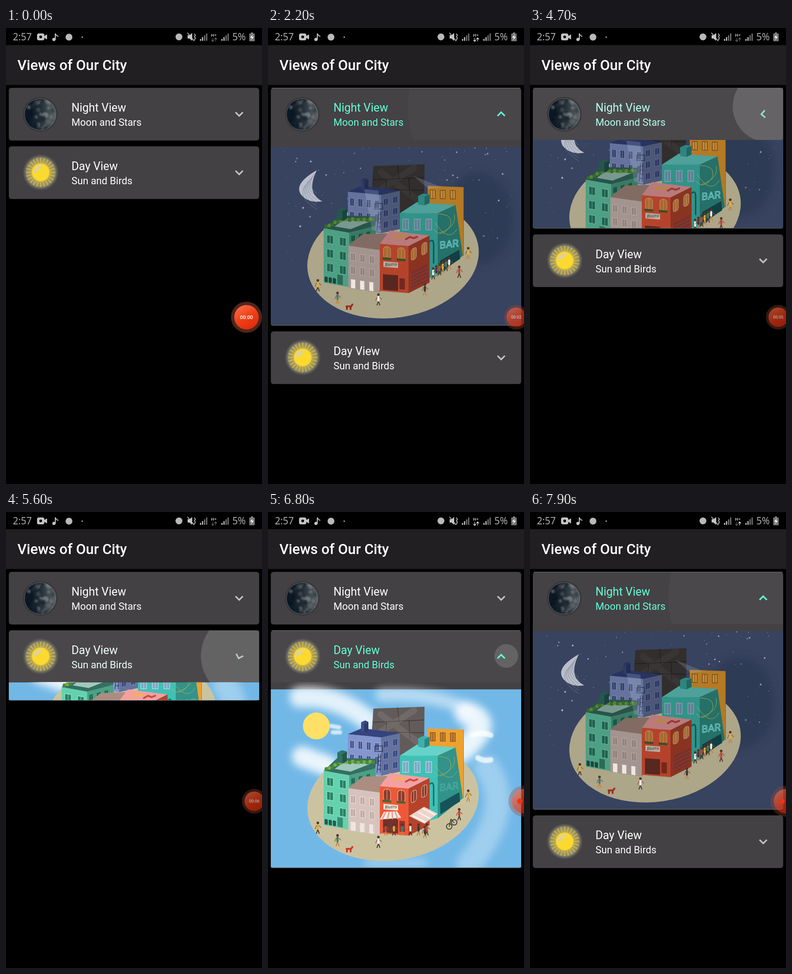
Write an HTML page that moves like this. It is 561 by 998 pixels and loops after 8 s.

```html
<!DOCTYPE html>
<html lang="en">
<head>
<meta charset="utf-8">
<title>Views of Our City</title>
<style>
html, body { margin: 0; height: 100%; overflow: hidden; background: #000; }
svg { display: block; font-family: Roboto, sans-serif; }
#stage { width: 561px; height: 998px; }
</style>
</head>
<body>
<svg id="stage" viewBox="0 0 561 998">
  <defs>
    <linearGradient id="moon"><stop offset="0" stop-color="#0a1624"/><stop offset=".45" stop-color="#1c2731"/><stop offset="1" stop-color="#5d6468"/></linearGradient>
    <radialGradient id="glow"><stop offset=".5" stop-color="#b3a65c"/><stop offset=".8" stop-color="#86826c"/><stop offset="1" stop-color="#666" stop-opacity="0"/></radialGradient>
    <linearGradient id="rec" x2=".6" y2="1"><stop offset="0" stop-color="#ff7450"/><stop offset=".6" stop-color="#ee3d16"/><stop offset="1" stop-color="#e02f0c"/></linearGradient>
    <clipPath id="globe"><circle cx="75" cy="58" r="34"/></clipPath>
    <filter id="soft" x="-50%" y="-50%" width="200%" height="200%"><feGaussianBlur stdDeviation="9"/></filter>
    <filter id="smooth"><feGaussianBlur stdDeviation="1.5"/></filter>
  </defs>
  <rect width="561" height="998"/>
  <g id="status" fill="#b9b9b9" font-family="'Open Sans', sans-serif"></g>
  <rect y="37.400" width="561" height="87.300" fill="#211f22"/>
  <text x="25" y="92" font-size="31.200" font-weight="500" fill="#fff">Views of Our City</text>
  <g id="cards"></g>
  <g id="button">
    <circle id="ring" cy="633" fill="#a04a3a" opacity=".5"/>
    <circle id="disc" cy="633" fill="url(#rec)"/>
    <text id="timer" text-anchor="middle" font-weight="500" fill="#fff"></text>
  </g>
  <circle id="dot" cx="552" cy="633" r="6" fill="#ee3413"/>
</svg>
<script>
const $ = id => document.getElementById(id);
const set = (id, attrs) => { for (const k in attrs) $(id).setAttribute(k, attrs[k]); };
const clamp = x => Math.max(0, Math.min(1, x));
const repeat = (n, draw) => [...Array(n).keys()].map(draw).join('');
const randoms = seed => () => (seed = seed * 16807 % 2147483647) / 2147483647;

const poly = (pts, fill, more = '') => `<polygon points="${pts}" fill="${fill}" ${more}/>`;
const rect = (x, y, w, h, fill, more = '') => `<rect x="${x}" y="${y}" width="${w}" height="${h}" fill="${fill}" ${more}/>`;
const disc = (x, y, r, fill, more = '') => `<circle cx="${x}" cy="${y}" r="${r}" fill="${fill}" ${more}/>`;
const line = (d, color, w = 1, more = '') => `<path d="${d}" fill="none" stroke="${color}" stroke-width="${w}" stroke-linecap="round" ${more}/>`;

// Multiply the channels of a #rrggbb colour by k.
const shade = (hex, k) => 'rgb(' + [1, 3, 5].map(i => Math.round(parseInt(hex.slice(i, i + 2), 16) * k)) + ')';

// Content drawn on a wall whose top edge runs from p to q.
const onWall = (p, q, content) =>
  `<g transform="matrix(1 ${(q[1] - p[1]) / (q[0] - p[0])} 0 1 ${p})">${content}</g>`;

const person = (x, y, i) => {
  const shirt = ['#c5403a', '#dcae38', '#3d7c72', '#eeeeee', '#3a3440'][i % 5];
  return line(`M${x} ${y + 4}l-3 9M${x} ${y + 4}l3 9`, i % 2 ? '#493831' : '#c9803c', 2) +
    line(`M${x} ${y - 5}v8`, shirt, 4.5) + line(`M${x - 3} ${y - 4}l-3 7M${x + 3} ${y - 4}l4 4`, '#8b5939', 1.4) +
    disc(x, y - 10, 2.8, '#54352a');
};

function nightSky() {
  const rnd = randoms(77);
  return rect(0, 388, 561, 391, '#38435f') +
    `<ellipse cx="460" cy="545" rx="75" ry="100" fill="#2b3751" filter="url(#soft)" opacity=".7"/>` +
    repeat(130, () => disc(35 + rnd() * 500, 390 + 250 * rnd() ** 1.7, .5 + rnd() ** 3 * 1.7, '#d3d6dd', `opacity="${.25 + rnd() * .6}"`)) +
    '<path d="M107 439Q56 468 72 492Q88 512 119 507Q82 489 107 439z" fill="#b9bec9"/>' +
    repeat(6, i => line(`M${101 - i * 4} ${448 + i * 5}q-18 25 ${6 + i * 4} ${42 + i * 2}`, '#747e95', .8));
}

function daySky() {
  const puff = (d, w, o) => line(d, '#fff', w, `opacity="${o}"`);
  return rect(0, 388, 561, 391, '#72b8e7') + '<g filter="url(#soft)">' +
    puff('M70 405Q150 398 225 460', 46, .8) + puff('M250 400Q370 395 440 435', 30, .5) +
    puff('M435 440Q500 460 420 525', 52, .85) + puff('M75 535L130 555', 46, .85) +
    puff('M480 560Q540 650 440 770', 55, .32) + puff('M220 768H340', 20, .3) + '</g><g filter="url(#smooth)">' +
    puff('M138 468l18 3M142 482h16', 9, .7) + puff('M448 488q20 -8 40 0M460 538q14 8 28 4', 12, .75) + '</g>' +
    disc(106, 468, 29.5, '#ffe066');
}

function city(night) {
  const tone = (hex, k = .76) => shade(hex, night ? k : 1);

  // Top corners a, b, c, d run left, front, right, back; foot is the lower right corner.
  const house = (a, b, c, d, h, wall, roof, front = '', side = '', foot = [c[0], c[1] + h]) => {
    const down = p => [p[0], p[1] + h];
    return poly([a, b, c, d], tone(roof)) + poly([a, b, down(b), down(a)], tone(wall)) +
      poly([b, c, foot, down(b)], tone(shadeHex(wall))) + onWall(a, b, front) + onWall(b, c, side);
  };
  const shadeHex = hex => '#' + [1, 3, 5].map(i => Math.round(parseInt(hex.slice(i, i + 2), 16) * .76).toString(16).padStart(2, '0')).join('');

  // Each window takes the middle half of its column.
  const panes = (width, cols, rows, pitch, glass, frame, top = 13, rx = 0) => {
    const cell = width / cols, h = pitch * .58;
    return repeat(cols * rows, i => {
      const x = (i % cols + .25) * cell, y = top + Math.floor(i / cols) * pitch;
      return rect(x, y, cell / 2, h, tone(glass), `stroke="${tone(frame)}" rx="${rx}"`) +
        line(`M${x + cell / 4} ${y}v${h}`, tone(frame), .8);
    });
  };

  const ground = `<ellipse rx="189" ry="129" transform="translate(274 633) rotate(-8.600)" fill="${tone('#cbc3a0', .85)}"/>`;
  const warehouse = poly('231,430 343,426 342,515 288,540 227,490', tone('#625b5a', .5)) +
    line('M230 460L342 455M229 481L342 483M284 428l3 30M260 459l-2 22M309 457l2 38', tone('#383535', .5), 1.2) +
    line('M247 443l80 60M320 434l-72 46', '#b7aba5', 14, `opacity="${night ? .05 : .17}"`);
  const orange = house([350, 474], [428, 476], [429, 476], [351, 473], 150, '#eda12f', '#eda12f',
    panes(66, 3, 1, 32, night ? '#ffb347' : '#c47c2c', '#6e4722', 8));

  const blue = house([175, 486], [248, 493], [289, 484], [206, 473], 84, '#8396ce', '#35437f',
    panes(73, 4, 2, 30, '#405189', '#a9b6de'), panes(41, 2, 3, 25, '#384882', '#8290bd', 10)) +
    house([204, 460], [211, 463], [220, 459], [213, 456], 20, '#3d4d8b', '#35437f') +
    line('M234 512h17v12h-17zM242 530l-3 40M247 530l-1 40' + repeat(4, i => `M241 ${536 + i * 9}h6`), '#202842', 1.2);

  const green = house([122, 566], [178, 576], [235, 561], [152, 538], 119, '#64d2ae', '#346f61',
    panes(56, 2, 3, 31, '#278268', '#acebd1') + rect(30, 96, 12, 21, tone('#3b8b70')) + repeat(3, i => rect(2 + i * 9, 105, 7, 12, tone('#2b594e'), 'rx="2"')),
    panes(50, 3, 1, 22, '#1d6451', '#4d9e82', 8), [237, 590]) +
    poly('235,561 152,538 237,540', tone('#346f61')) + poly('146,562 164,549 224,551 181,568', tone('#9fc9bd')) +
    repeat(17, i => disc(128 + i * 6.4, Math.max(546, 562 - i * 3) + i % 3, 4, tone(i % 2 ? '#74ad46' : '#4b8a36'))) +
    house([152, 526], [163, 529], [173, 524], [162, 521], 21, '#2f7265', '#2f7265');

  const stone = house([176, 604], [245, 614], [262, 577], [208, 579], 93, '#d7c3bd', '#ab8d82',
    panes(62, 3, 3, 29, '#c2aaa3', '#f4e8e3', 15) + repeat(3, i => rect(6 + i * 20, 73, 9, 19, '#efe6e0')));

  const teal = poly('350,580 372,580 372,670 350,676', tone('#40c1b5')) +
    house([289, 533], [372, 533], [411, 515], [326, 509], 137, '#40c1b5', '#66d3ca',
      panes(76, 3, 1, 41, '#78abc8', '#e7dfe5'), '', [427, 626]) +
    house([329, 495], [343, 497], [354, 492], [340, 490], 19, '#3cb0aa', '#3cb0aa') +
    line('M373 535q35 0 26 27q-20 27 -35 7M376 576q38 -12 32 -40M366 554q30 45 48 14', '#cfb647', 1, 'opacity=".75"') +
    line('M355 595q8 -7 8 9v38', tone('#156c6d'), 3) + poly('377,637 419,613 421,633 378,661', tone('#165358')) +
    `<text transform="translate(376 611) skewY(-7)" font-size="22" fill="none" stroke="${night ? '#86e1df' : '#57b1a8'}">BAR</text>`;

  const lamp = night ? '#e08a3a' : '#8e3c2d';
  const bistro = house([245, 600], [308, 605], [354, 582], [267, 571], 103, '#ee5838', '#f4a0a2',
    panes(63, 2, 1, 46, lamp, '#ead0b5', 5, 7) + repeat(2, i => rect(6 + i * 31, 29, 19, 5, tone('#50642f'))) +
    rect(8, 38, 32, 12, tone('#f3e8d7')) + rect(7, 66, 33, 34, tone('#74332a')) + rect(43, 72, 12, 24, tone('#9b3327')),
    panes(46, 2, 1, 44, lamp, '#ead0b5', 10, 5) + (night ? rect(7, 60, 35, 36, '#78302a') + repeat(4, i => line(`M7 ${67 + i * 8}h35`, '#95463a')) : '')) +
    '<text x="256" y="649" font-family="\'Noto Serif\', serif" font-style="italic" font-size="9.500" fill="#2c2525" transform="rotate(-2 256 649)">Bistro</text>' +
    repeat(2, i => line(`M${276 + i * 26} ${587 + i * 3}l9 -5l8 3l8 -3`, tone(i ? '#cf4940' : '#efb540'), 4));
  const awnings = poly('254,656 283,655 292,669 245,673', '#f8ebe0') + repeat(4, i => line(`M${258 + i * 7} 657L${251 + i * 11} 671`, '#eb9c91', 3)) +
    poly('309,665 342,645 372,660 343,682', '#eed3ca') + repeat(3, i => line(`M${318 + i * 11} ${665 - i * 8}l25 13`, '#fff3ea', 3)) +
    line('M397 682a6 6 0 1 0 .1 0M408 673a6 6 0 1 0 .1 0M397 688l4 -16l7 8', '#383b2b', 1.7);
  const beams = poly('211,480 242,484 248,575 228,570', '#c5d0eb', 'opacity=".2"') + poly('318,451 380,476 352,480', '#c7cad3', 'opacity=".18"');

  // Walkers follow the rim; guests queue at the bar by night and at the bistro by day.
  const walkers = repeat(6, i => {
    const a = Math.PI * (1 - i / 5) - .12;
    return person(274 + 166 * Math.cos(a), 655 + 62 * Math.sin(a) - 28 * Math.cos(a), i + 1);
  });
  const guests = repeat(6, i => night ? person(362 + i * 7, 664 - i * 4.5, i + 3) : person(258 + i * 18, 694, i));
  const dog = line('M172 737h10M173 737v6M181 737v6M182 737l3 -4', tone('#ce3b2a'), 4);

  return (night ? nightSky() : daySky()) + ground + warehouse + orange + blue + green + stone + teal + bistro +
    (night ? beams : awnings) + walkers + guests + dog;
}

function moonIcon() {
  const rnd = randoms(9);
  const spots = repeat(60, () => {
    const x = rnd() * 70, light = rnd() * 70 < x;
    return disc(40 + x, 23 + rnd() * 70, 1.5 + rnd() * 5, light ? '#a9adaa' : '#0b141e', `opacity="${.15 + rnd() * .35}"`);
  });
  return disc(75, 58, 38, '#383638') + disc(75, 58, 34.5, 'url(#moon)', 'stroke="#777b7c" stroke-width=".7"') +
    `<g clip-path="url(#globe)"><g filter="url(#smooth)">${spots}</g></g>`;
}

const sunIcon = () => disc(76, 57, 40, 'url(#glow)') +
  repeat(24, i => poly('74,25 78,25 77,38 75,38', '#d9c03e', `opacity=".65" transform="rotate(${i * 15} 76 57)"`)) +
  disc(76, 57, 20, '#e8c43b') + disc(76, 57, 18.5, '#fcd92f') +
  '<path d="M60 59a17 17 0 0 1 21 -17q-9 12 -21 17z" fill="#ddd39b"/>';

const HEAD = 115.3, EXTRA = 405, LEFT = 6.2, WIDTH = 548.6;
const tiles = [
  { y: 130.9, title: 'Night View', sub: 'Moon and Stars', icon: moonIcon(), night: true },
  { y: 258.9, title: 'Day View', sub: 'Sun and Birds', icon: sunIcon(), night: false },
];

$('cards').innerHTML = tiles.map((d, i) => `<g id="card${i}">
  <rect id="bg${i}" x="${LEFT}" width="${WIDTH}" rx="6" fill="#434143"/>
  <svg id="view${i}" x="${LEFT}" y="114" width="${WIDTH}"><g id="scene${i}">${city(d.night)}</g></svg>
  <g id="edge${i}">${rect(8, 0, 545, 1, '#707072')}<rect id="foot${i}" x="8" width="545" height="1" fill="#707072"/></g>
  <svg x="${LEFT}" width="${WIDTH}" height="114"><rect id="lit${i}" width="549" height="114" fill="#fff"/><circle id="wave${i}" fill="#fff"/></svg>
  ${d.icon}
  <g id="label${i}"><text x="143.500" y="51.800" font-size="24.900">${d.title}</text><text x="143.500" y="83" font-size="21.800">${d.sub}</text></g>
  <path id="arrow${i}" d="M-8 -4L0 4L8 -4" fill="none" stroke-width="3.400"/>
</g>`).join('');

const bars = x => repeat(4, i => rect(x + i * 4.5, 24 - i * 4, 2.6, 4 + i * 4, i < 2 ? '#c4c4c4' : '#777'));
$('status').innerHTML =
  '<text x="15" y="27" font-size="21">2:57</text>' +
  rect(68, 12, 16, 15, '#c4c4c4', 'rx="4"') + poly('83,18 90,14 90,25 83,21', '#c4c4c4') + disc(76, 19.5, 3, '#000') +
  line('M108 25V12q2 5 6 6', '#c4c4c4', 2) + disc(105, 25, 3.5, '#c4c4c4') +
  disc(138, 20, 7.5, '#b9b9b9') + disc(167, 20, 1.5, '#c4c4c4') + disc(379, 19.5, 7.5, '#b9b9b9') +
  poly('398,16 402,16 408,11 408,28 402,23 398,23', '#c4c4c4') + line('M398 11l14 17M413 13l2 3l-2 3l2 3l-2 4', '#c4c4c4', 1.7) +
  bars(425) + bars(472) + '<text x="449" y="18.500" font-size="9.500" font-weight="700">H+</text>' +
  line('M453 22v7M450.500 26.500l2.500 3l2.500 -3', '#fff', 1.2, 'id="down"') +
  line('M459.500 29v-7M457 24.500l2.500 -3l2.500 3', '#fff', 1.2, 'id="up"') +
  '<text x="496" y="27" font-size="21">5%</text>' +
  rect(537, 10, 4, 3, '#aaa') + rect(533, 12, 12, 17, '#777', 'rx="1"') + poly('541,14 535,21 539,21 537,27 543,19 539,19', '#fff');

const FADE = 400;
const taps = [
  { tile: 0, time: 1800, hold: 100 },
  { tile: 0, time: 4500, hold: 100 },
  { tile: 1, time: 5500, hold: 0 },
  { tile: 1, time: 6800, hold: 0 },
  { tile: 0, time: 7620, hold: 0 },
];

// Every tap toggles its tile; the move takes 200 ms and closing plays it backwards.
function openness(mine, t) {
  let p = 0, open = false;
  for (const { time, hold } of mine) {
    const x = (t - time - hold - 38) / 200;
    if (x < 0) break;
    open = !open;
    p = clamp(open ? x : 1 - x) ** 2;
  }
  return p;
}

function drawTile(i, t, shift) {
  const mine = taps.filter(tap => tap.tile === i);
  const p = openness(mine, t), grow = EXTRA * p;
  const mix = (a, b) => Math.round(a + (b - a) * p);
  const tint = v => `rgb(${mix(v, 100)},${mix(v, 255)},${mix(v, 218)})`;
  set('card' + i, { transform: `translate(0 ${tiles[i].y + shift})` });
  set('bg' + i, { height: HEAD + grow });
  set('view' + i, { height: grow, display: p ? 'inline' : 'none' });
  set('scene' + i, { transform: `translate(${-LEFT} ${15.3 - 388 - (EXTRA - grow) / 2})` });
  set('edge' + i, { opacity: p });
  set('foot' + i, { y: HEAD + grow - 1 });
  set('label' + i, { fill: tint(255) });
  set('arrow' + i, { stroke: tint(196), transform: `translate(511 57.500) rotate(${180 * p})` });

  const tap = mine.find(({ time, hold }) => t >= time && t < time + hold + FADE);
  let fade = 0;
  if (tap) {
    const age = t - tap.time - tap.hold;
    fade = clamp((1 - age / FADE) * 1.5) ** 2;
    set('wave' + i, { cx: 516, cy: tap.hold ? 41 : 56, r: 26 - .17 * tap.hold + .69 * Math.max(0, age) });
  }
  set('lit' + i, { opacity: .035 * fade });
  set('wave' + i, { opacity: .15 * fade });
  return grow;
}

function drawButton(t) {
  const tuck = clamp((t - 1000) / 300), out = t >= 6300;
  const r = out ? 34 : 34 - 7 * tuck;
  const x = out ? 547 + 14 * clamp((t - 6300) / 300) : 527 + 17 * tuck;
  const sec = t < 200 ? 0 : t < 1300 ? 1 : Math.floor((t - 300) / 1000) + 1;
  set('ring', { cx: x, r });
  set('disc', { cx: x, r: r * .79 });
  set('button', { opacity: 1 - .33 * tuck });
  set('timer', { x, y: 633 + r * .12, 'font-size': r * .33 });
  $('timer').textContent = out ? '' : '00:0' + sec;
  set('dot', { opacity: out ? 1 : 0 });
}

function frame(now) {
  const t = Math.floor(now % 8000 / 100) * 100; // ten pictures a second
  const grow = drawTile(0, t, 0);
  drawTile(1, t, grow);
  drawButton(t);
  const within = (a, b) => t >= a && t < b;
  set('down', { opacity: within(2000, 4000) || within(6000, 7200) ? .9 : .4 });
  set('up', { opacity: within(2000, 3000) || t >= 6000 ? .9 : .4 });
  requestAnimationFrame(frame);
}
frame(0);
</script>
</body>
</html>
```
